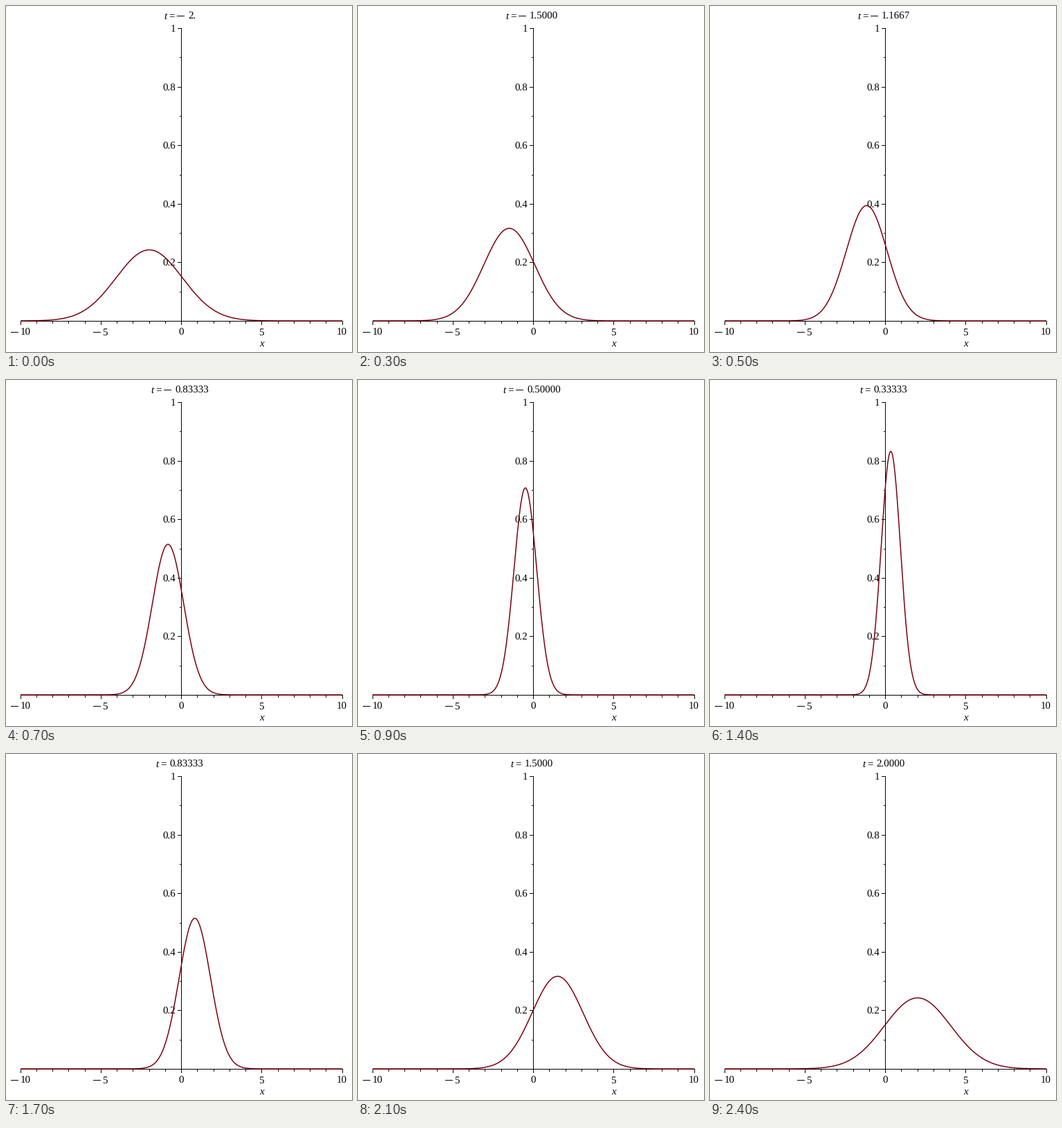
A matplotlib script that plays this animation: 500x500 px, repeating every 2.5 s.

```python
import matplotlib.pyplot as plt
import numpy as np
from matplotlib.animation import FuncAnimation

SIZE, DPI = 500, 100
PT = 72 / DPI            # points per pixel
EM = 15                  # font size in pixels
MINUS = 11               # length of a minus sign
FRAMES = 25
BASE, TOP = 455, 32      # pixel rows of y = 0 and y = 1

plt.rcParams["font.family"] = "Liberation Serif"
plt.rcParams["text.hinting"] = "no_hinting"
fig = plt.figure(figsize=(SIZE / DPI, SIZE / DPI), dpi=DPI, facecolor="white")
ax = fig.add_axes([0, 0, 1, 1])
ax.set(xlim=(0, SIZE), ylim=(SIZE, 0))
ax.axis("off")


def px(x):
    return 253.5 + 23.25 * x


def py(y):
    return BASE - (BASE - TOP) * y


def width(num):
    return EM * sum(0.25 if c == "." else 0.5 for c in num)


def line(x0, y0, x1, y1):
    """One pixel wide line through whole pixel columns or rows."""
    return ax.plot([x0, x1], [y0, y1], color="black", lw=PT, snap=False,
                   solid_capstyle="butt", zorder=2)[0]


def hline(x0, x1, row):
    return line(x0, row + 0.5, x1, row + 0.5)


def vline(col, y0, y1):
    return line(col + 0.5, y0, col + 0.5, y1)


def text(x, y, s, style="normal"):
    return ax.text(x, y, s, fontsize=EM * PT, style=style,
                   ha="left", va="baseline", zorder=3)


def density(x, t):
    spread = 1 + 4 * t * t
    return np.exp(-2 * (x - t) ** 2 / spread) / np.sqrt(spread)


def draw_axes():
    hline(21, 487, BASE)
    vline(253, TOP, BASE + 1)
    for k in range(-10, 11):
        col = int(px(k))
        major = k % 5 == 0
        vline(col, BASE, BASE + (6 if major else 4))
        if major:
            num = str(abs(k))
            shift = MINUS + 2.5 if k < 0 else 0
            left = round(col - (shift + width(num)) / 2)
            text(left + shift, 476, num)
            if k < 0:
                hline(left, left + MINUS, 471)
    for k in range(11):
        row = round(py(k / 10))
        major = k % 2 == 0 and k > 0
        hline(248 if major else 251, 254, row)
        if major:
            num = f"{k / 10:g}"
            text(244.7 - width(num), row + 5.4, num)
    text(366, 492, "x", "italic")


draw_axes()
xs = np.linspace(-10, 10, 601)
curve, = ax.plot([], [], color="#78000e", lw=1.5 * PT, zorder=4,
                 solid_capstyle="butt", solid_joinstyle="round")
var = text(0, 19, "t", "italic")
equals = text(0, 19, "=")
minus = hline(0, MINUS, 14)
value = text(0, 19, "")


def title_number(i, t):
    if i == 0 or t == 0:
        return f"{abs(t):.0f}."
    return f"{abs(t):.{4 if abs(t) >= 1 else 5}f}"


def update(i):
    t = (i - 12) / 6
    curve.set_data(px(xs), py(density(xs, t)))
    num = title_number(i, t)
    shift = 35 if t < 0 else 20.5
    left = round(251 - (shift + width(num)) / 2)
    var.set_x(left)
    equals.set_x(left + 7)
    minus.set_xdata([left + 19, left + 19 + MINUS])
    minus.set_visible(t < 0)
    value.set_x(left + shift)
    value.set_text(num)
    return curve, var, equals, minus, value


anim = FuncAnimation(fig, update, frames=FRAMES, interval=100,
                     repeat=True, repeat_delay=0)
plt.show()
```
